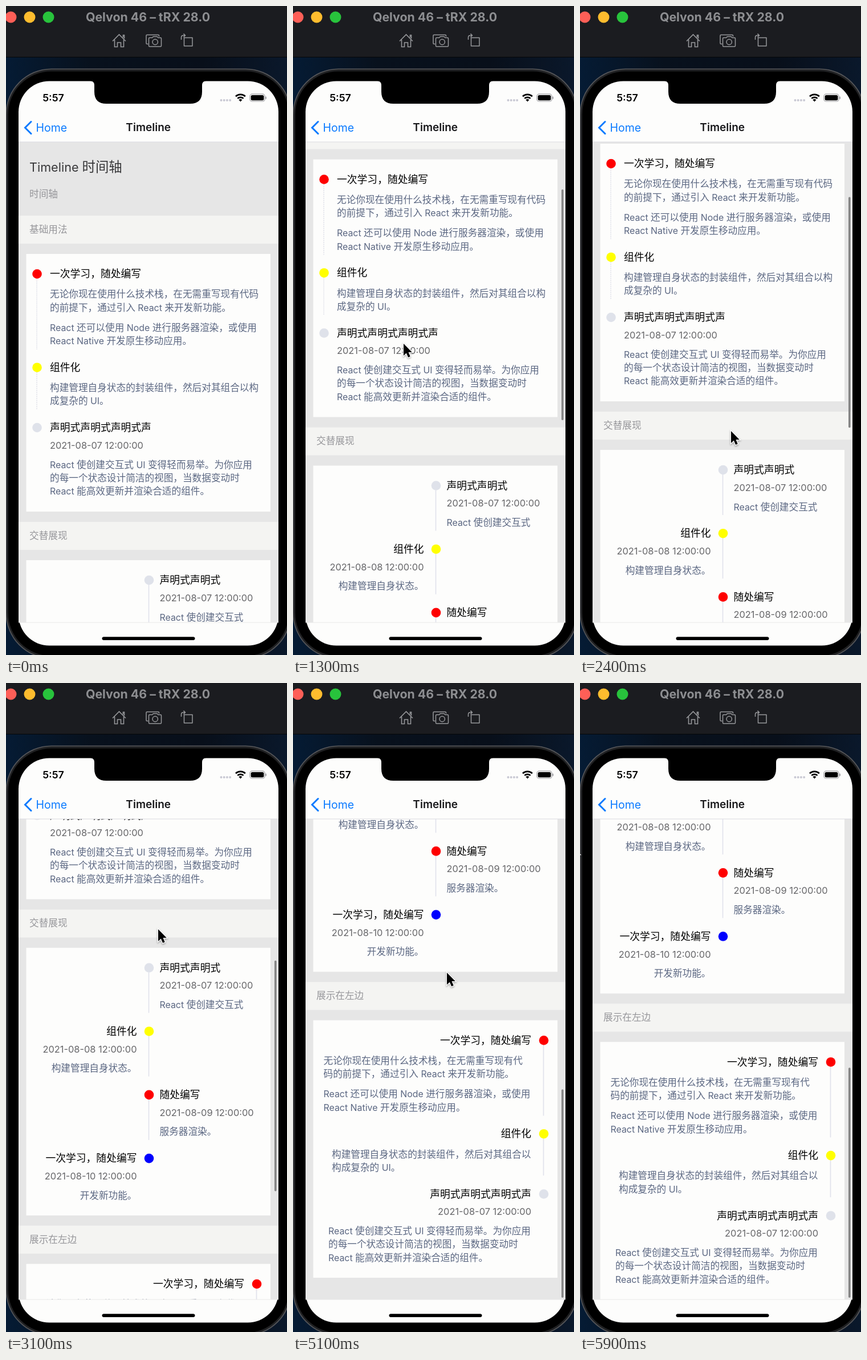
An HTML page with a canvas that plays this animation: 493 by 1136 pixels, repeating every 6100 ms.

```html
<!DOCTYPE html>
<html lang="zh-CN">
<head>
<meta charset="utf-8">
<title>Timeline</title>
<style>
html, body { margin: 0; width: 100%; height: 100%; overflow: hidden; background: #0a1220; }
canvas { display: block; width: 493px; height: 1136px; }
</style>
</head>
<body>
<canvas id="stage" width="493" height="1136"></canvas>
<script>
const W = 493, H = 1136, LOOP = 6100, STEP = 100;
const MAX_SCROLL = 895;
const ctx = document.getElementById('stage').getContext('2d');
const FONT = 'Inter, "Noto Sans CJK SC", "Noto Sans CJK", sans-serif';
const PAPER = '#fdfdfc', INK = '#000', DATE = '#666669', BODY = '#5b6782', MUTED = '#96969a';
const RED = '#fe0000', YELLOW = '#ffff00', BLUE = '#0000fe', PALE = '#dfe2ea';

// Time, pointer x, pointer y, scroll, glides to the next key
const KEYS = [
  [100, 70, 690, 0], [500, 190, 756, 0],
  [1300, 194, 591, 165.5], [1400, 197, 563, 193],
  [1600, 206, 576, 193, 1], [1900, 254, 665, 193, 1], [2200, 263, 732, 193, 1], [2400, 265, 744, 193],
  [3100, 267, 431, 506.5, 1], [3700, 299, 890, 506.5, 1], [4000, 305, 957, 506.5],
  [5100, 270, 507, MAX_SCROLL, 1], [5700, 20, 318, MAX_SCROLL], [5900, -15.5, 285, MAX_SCROLL]
];

function stateAt(t) {
  const i = KEYS.findLastIndex(k => k[0] <= t);
  if (i < 0) return { x: -100, y: 0, scroll: 0 };
  const a = KEYS[i], b = a[4] ? KEYS[i + 1] : a;
  const p = b === a ? 0 : (t - a[0]) / (b[0] - a[0]);
  const mix = n => a[n] + (b[n] - a[n]) * p;
  const s = { x: mix(1), y: mix(2), scroll: mix(3) };
  if (t >= 5100) {
    const k = (t - 5100) / 90;
    s.scroll += 38 * (1 + k) * Math.exp(-k);
  }
  return s;
}

function rect(x, y, w, h, color) {
  ctx.fillStyle = color;
  ctx.fillRect(x, y, w, h);
}

function round(x, y, w, h, r, color) {
  ctx.fillStyle = color;
  ctx.beginPath();
  ctx.roundRect(x, y, w, h, r);
  ctx.fill();
}

function dot(x, y, r, color) {
  ctx.fillStyle = color;
  ctx.beginPath();
  ctx.arc(x, y, r, 0, 7);
  ctx.fill();
}

function stroke(d, color, width) {
  ctx.strokeStyle = color;
  ctx.lineWidth = width;
  ctx.stroke(new Path2D(d));
}

// Latin and Chinese runs have separate sizes; y is the middle of the line
function text(str, x, y, color, { cjk = 16.65, latin = 15.9, weight = 400, align = 0 } = {}) {
  const runs = (str.match(/[\u2e80-\uffff]+|[^\u2e80-\uffff]+/g) || []).map(s => {
    const size = s.charCodeAt(0) >= 0x2e80 ? cjk : latin;
    const font = `${weight} ${size}px ${FONT}`;
    ctx.font = font;
    return { s, font, w: ctx.measureText(s).width };
  });
  x -= align * runs.reduce((sum, r) => sum + r.w, 0);
  ctx.fillStyle = color;
  for (const r of runs) {
    ctx.font = r.font;
    ctx.fillText(r.s, x, y + latin * 0.365);
    x += r.w;
  }
}

const title = (s, x, y, align) => text(s, x, y, INK, { cjk: 17.8, latin: 17, align });
const date = (s, x, y, align) => text(s, x, y, DATE, { latin: 16.4, align });

function paragraph(lines, x, y) {
  lines.forEach((s, i) => text(s, x, y + i * 23.4, BODY));
}

function band(y, label) {
  rect(22, y, 456, 49, '#f4f4f2');
  text(label, 41, y + 24, MUTED);
}

function card(y, h) {
  rect(35.5, y, 428.5, h, PAPER);
}

function rail(x, y, len, dashed) {
  ctx.save();
  if (dashed) ctx.setLineDash([2, 1.5]);
  stroke(`M${x} ${y}v${len}`, dashed ? '#cfd1df' : '#e0e2eb', dashed ? 1 : 1.6);
  ctx.restore();
}

// Three entries, with the dots left or right of the text
function basicList(y, dotX, textX, align, paras, lefts) {
  const y2 = y + 163.7, y3 = y + 269;
  rail(dotX - 0.5, y + 8, 124, !align);
  rail(dotX - 0.5, y2 + 8, 65, !align);
  dot(dotX, y, 8.3, RED);
  dot(dotX, y2, 8.3, YELLOW);
  dot(dotX, y3, 8.3, PALE);
  title('一次学习，随处编写', textX, y, align);
  paragraph(paras[0], lefts[0], y + 35.5);
  paragraph(['React 还可以使用 Node 进行服务器渲染，或使用', 'React Native 开发原生移动应用。'], lefts[0], y + 94);
  title('组件化', textX, y2, align);
  paragraph(paras[1], lefts[1], y2 + 35.5);
  title('声明式声明式声明式声', textX, y3, align);
  date('2021-08-07 12:00:00', textX, y3 + 31, align);
  paragraph(['React 使创建交互式 UI 变得轻而易举。为你应用', '的每一个状态设计简洁的视图，当数据变动时',
    'React 能高效更新并渲染合适的组件。'], lefts[2], y3 + 64.7);
}

function alternateList(y) {
  const items = [
    ['声明式声明式', 'React 使创建交互式', PALE],
    ['组件化', '构建管理自身状态。', YELLOW],
    ['随处编写', '服务器渲染。', RED],
    ['一次学习，随处编写', '开发新功能。', BLUE]
  ];
  items.forEach(([name, note, color], i) => {
    const top = y + i * 111.2, align = i % 2, x = align ? 229.5 : 269.5;
    if (i < 3) rail(250.5, top + 8, 71);
    dot(251, top, 8.3, color);
    title(name, x, top, align);
    date('2021-08-' + String(7 + i).padStart(2, '0') + ' 12:00:00', x, top + 31, align);
    text(note, x, top + 64.7, BODY, { align });
  });
}

function drawPage(scroll) {
  ctx.save();
  ctx.beginPath();
  ctx.rect(22, 238, 456, 841);
  ctx.clip();
  rect(22, 238, 456, 841, '#e6e6e6');
  ctx.translate(0, -scroll);
  text('Timeline 时间轴', 41, 282.5, '#38383a', { cjk: 23.4, latin: 21.6 });
  text('时间轴', 41, 329, MUTED);
  band(367, '基础用法');
  card(434, 451);
  basicList(469, 54.5, 77, 0, [
    ['无论你现在使用什么技术栈，在无需重写现有代码', '的前提下，通过引入 React 来开发新功能。'],
    ['构建管理自身状态的封装组件，然后对其组合以构', '成复杂的 UI。']
  ], [77, 77, 77]);
  band(903, '交替展现');
  card(970, 468.5);
  alternateList(1005);
  band(1456.3, '展示在左边');
  card(1523.3, 450.7);
  basicList(1558.5, 440, 418, 1, [
    ['无论你现在使用什么技术栈，在无需重写现有代', '码的前提下，通过引入 React 来开发新功能。'],
    ['构建管理自身状态的封装组件，然后对其组合以', '构成复杂的 UI。']
  ], [53.5, 68, 62]);
  ctx.restore();

  if (scroll > 0) {
    const top = 241 + 0.483 * Math.min(scroll, MAX_SCROLL) + Math.max(0, scroll - MAX_SCROLL);
    round(471, top, 3.6, Math.min(top + 404, 1076) - top, 1.8, '#858585');
  }
}

function drawWindow() {
  const sky = ctx.createLinearGradient(0, 0, W, 0);
  sky.addColorStop(0, '#051b34');
  sky.addColorStop(0.3, '#08111d');
  sky.addColorStop(0.7, '#080f1a');
  sky.addColorStop(1, '#0a182b');
  rect(0, 0, W, H, sky);
  rect(0, 0, W, 90, '#1b1c20');
  rect(0, 89, W, 1, '#050608');
  dot(8.5, 19.5, 10, '#fe5f57');
  dot(41.5, 19.5, 10, '#febc2e');
  dot(74.5, 19.5, 10, '#28c33c');
  text('Qelvon 46 – tRX 28.0', 249, 19, '#8d8e91', { latin: 21.3, weight: 700, align: 0.5 });

  const gray = '#97989b';
  stroke('M187 61.5L198.500 50L210 61.5M190.500 59V71.500H195.500V64H201.500V71.500H206.500V59M205.500 55V51H207.500V57', gray, 1.6);
  ctx.lineJoin = 'round';
  stroke('M249.500 66.500H247.500Q246 66.500 246 65V52Q246 50.500 247.500 50.500H267Q268.500 50.500 268.500 52V53.500', gray, 1.5);
  stroke('M252 55.500H256.500L258.500 53.500H265L267 55.500H271Q272.500 55.500 272.500 57V69.500Q272.500 71 271 71H252Q250.500 71 250.500 69.500V57Q250.500 55.500 252 55.500Z', gray, 1.5);
  stroke('M257 63a4.700 4.700 0 1 0 9.400 0a4.700 4.700 0 1 0 -9.400 0', gray, 1.5);
  stroke('M312.500 55.500H327V70H312.500ZM307.500 59V55Q307.500 51.500 311 51.500H314M311.500 48.500L314.500 51.500L311.500 54.500', gray, 1.5);
  ctx.lineJoin = 'miter';
}

function drawPhone() {
  round(-0.5, 109.5, 501, 1033, 80, '#56575a');
  round(1, 111, 498, 1030, 79, '#202123');
  round(4, 114.5, 492, 1023, 75, '#000');
  round(22, 131.5, 456, 988, 54, PAPER);

  ctx.fillStyle = '#000';
  ctx.fill(new Path2D('M148 131Q155 131.500 155 139V150Q155 171 176 171H323Q344 171 344 150V139Q344 131.500 351 131Z'));

  text('5:57', 83, 161, INK, { latin: 17.8, weight: 600, align: 0.5 });
  for (let i = 0; i < 4; i++) dot(377.5 + i * 5.2, 165, 2, '#c9c9d4');
  ctx.lineCap = 'butt';
  stroke('M403 158.200A12.300 12.300 0 0 1 419.800 158.200', INK, 2.8);
  stroke('M406.200 161.900A7.600 7.600 0 0 1 416.600 161.900', INK, 2.6);
  ctx.fillStyle = INK;
  ctx.fill(new Path2D('M408.400 164.200Q411.400 161.700 414.400 164.200L411.400 167.400Z'));
  ctx.strokeStyle = '#a0a0a4';
  ctx.lineWidth = 1.2;
  ctx.beginPath();
  ctx.roundRect(427.8, 154.2, 26.4, 12.8, 4);
  ctx.stroke();
  round(429.6, 156, 22.8, 9.2, 2.5, INK);
  round(455.3, 158.5, 1.7, 4.4, 1, '#a0a0a4');

  ctx.lineCap = 'round';
  stroke('M44 202.500L33.500 213L44 223.500', '#0a7aff', 3);
  ctx.lineCap = 'butt';
  text('Home', 52.5, 212.8, '#0a7aff', { latin: 19.5 });
  text('Timeline', 249.7, 212.5, '#17171a', { latin: 19, weight: 600, align: 0.5 });
}

function drawEdges() {
  rect(22, 237.5, 456, 1, '#dcdce2');
  rect(22, 1078.7, 456, 0.8, '#e4e4e4');
  round(168.5, 1104.2, 163, 5.8, 2.9, INK);
}

function drawPointer(x, y) {
  const arrow = new Path2D('M0 0V24.500L5.600 19.200L9.400 28L13.600 26.200L9.900 17.500H17.200Z');
  ctx.save();
  ctx.translate(x, y);
  ctx.scale(0.86, 0.86);
  ctx.shadowColor = 'rgba(0,0,0,.35)';
  ctx.shadowBlur = 3;
  ctx.shadowOffsetY = 1.5;
  ctx.strokeStyle = '#fff';
  ctx.lineWidth = 3;
  ctx.stroke(arrow);
  ctx.shadowColor = 'transparent';
  ctx.fillStyle = '#000';
  ctx.fill(arrow);
  ctx.restore();
}

const start = performance.now();

function frame() {
  const elapsed = (performance.now() - start) % LOOP;
  const s = stateAt(Math.floor(elapsed / STEP) * STEP);
  drawWindow();
  drawPhone();
  drawPage(s.scroll);
  drawEdges();
  drawPointer(s.x, s.y);
  requestAnimationFrame(frame);
}
frame();
</script>
</body>
</html>
```
